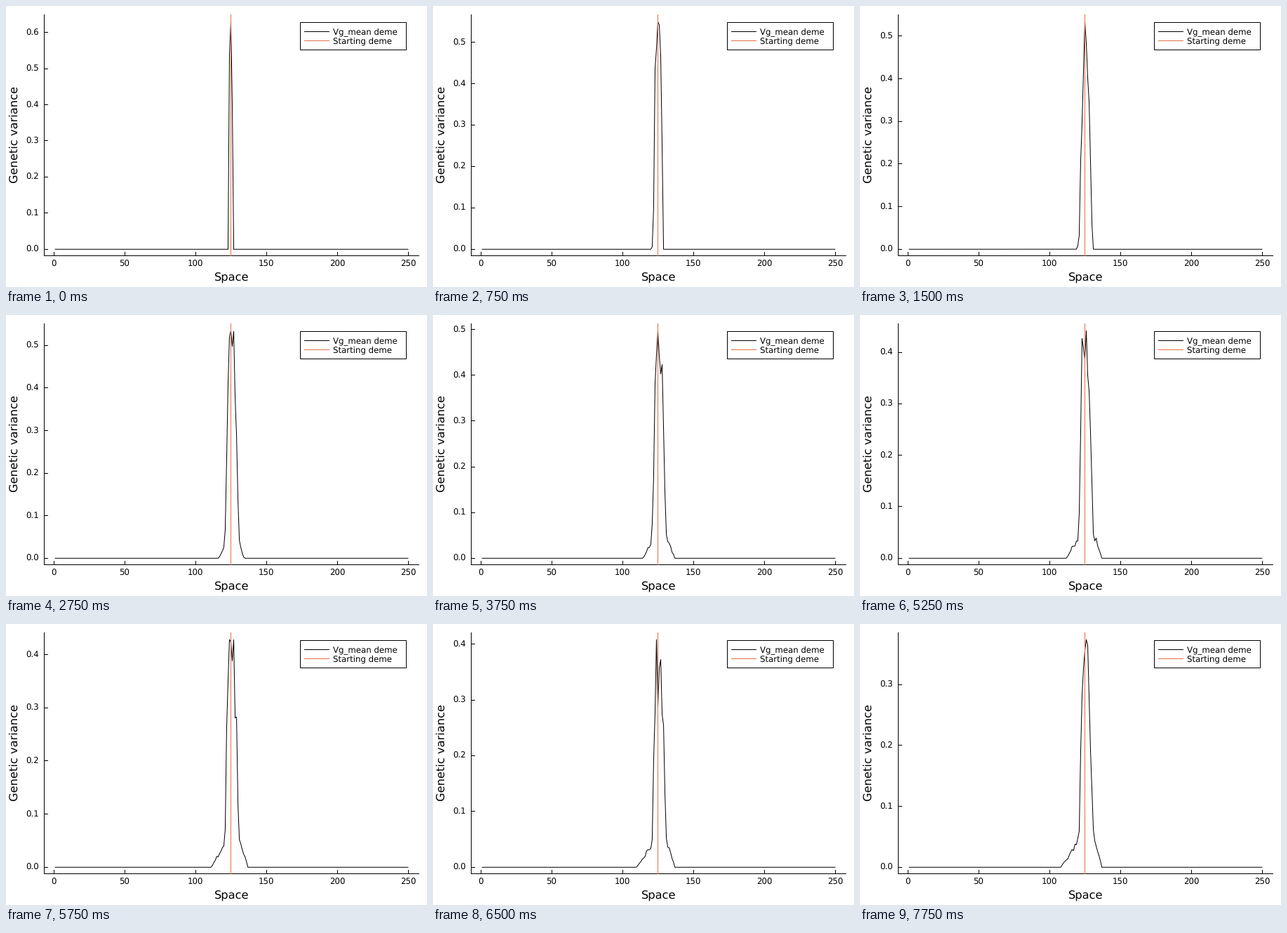
These frames come from a looping animation (600 by 400 pixels, 8000 ms). A matplotlib script:

```python
import numpy as np
import matplotlib.pyplot as plt
from matplotlib.animation import FuncAnimation
from matplotlib.patches import Rectangle

W, H, DPI = 600, 400, 100
PX = 72 / DPI                       # one pixel in points
FRAMES, INTERVAL = 32, 250
LEFT, RIGHT, TOP, BOTTOM = 55, 588, 12, 355.5     # plot area
AXIS_X, AXIS_Y = 54, 355            # pixels of the axis lines
ORANGE = "#E26F46"
START = 125

demes = np.arange(1, 251)
noise = np.random.default_rng(11).normal(0, .1, (FRAMES, demes.size))


def settle(step, pace):
    """Rise from 0 towards 1."""
    return 1 - np.exp(-step / pace)


def variance(step):
    """Mean genetic variance per deme: a steep core on a spreading foot."""
    low = START - 1.5 - 15.5 * (step / (FRAMES - 1)) ** .75
    high = START + 2 + 10 * min(step / 15, 1)
    left = demes < START
    off = np.abs(demes - START)

    grown = settle(step, 4)
    width = np.where(left, 1.7 + 1.7 * grown, 1.25 + 3.65 * grown)
    core = np.exp(-np.minimum(off / width, 5) ** 3.5)

    peak = np.interp(step, [0, 1, 6, 11, 21, 31],
                     [.63, .56, .534, .535, .442, .374])
    ramp = np.where(left, (demes - low) / max(START - 3 - low, 1),
                    (high - demes) / max(high - START - 4, 1))
    foot = np.where(left, .055, .08) * settle(step, 10) * ramp.clip(0, 1)

    v = np.maximum(core, foot / peak) * (1 + noise[step] * min(step / 3, 1))
    v[(demes <= low) | (demes >= high)] = 0
    return v * peak / v.max()


def to_x(deme):
    pad = .03 * 249
    return LEFT + (deme - 1 + pad) * (RIGHT - LEFT) / (249 + 2 * pad)


def to_y(value, peak):
    return BOTTOM - (value / peak + .03) * (BOTTOM - TOP) / 1.06


plt.rcParams.update({"font.family": "DejaVu Sans", "text.hinting": "none"})
fig = plt.figure(figsize=(W / DPI, H / DPI), dpi=DPI, facecolor="white")
ax = fig.add_axes([0, 0, 1, 1])
ax.set(xlim=(0, W), ylim=(H, 0))
ax.axis("off")


def line(xs, ys, color="black", z=2):
    return ax.plot(xs, ys, color=color, lw=PX, zorder=z)[0]


def label(x, y, text, size=11.8, **kw):
    return ax.text(x, y, text, fontsize=size * PX, va="baseline", **kw)


# axes
line([AXIS_X, AXIS_X], [TOP, AXIS_Y])
line([AXIS_X, RIGHT], [AXIS_Y, AXIS_Y])
for deme in range(0, 251, 50):
    x = to_x(deme)
    line([x, x], [AXIS_Y - 5, AXIS_Y])
    label(x, 371, str(deme), ha="center")
label(321.5, 392, "Space", 16.2, ha="center")
label(17, 183.3, "Genetic variance", 16.2, ha="center",
      rotation=90, rotation_mode="anchor")

y_ticks = []
for i in range(7):
    y_ticks.append((i / 10, line([AXIS_X, AXIS_X + 5], [0, 0]),
                    label(47, 0, f"{i / 10:.1f}", ha="right")))

# data
curve = line(to_x(demes), np.zeros(demes.size), z=3)
line([to_x(START)] * 2, [TOP, AXIS_Y], ORANGE, z=4)

# legend
ax.add_patch(Rectangle((419, 23), 151, 39, fc="white", ec="black",
                       lw=PX, zorder=5))
for y, color, text in ((36, "black", "Vg_mean deme"),
                       (49, ORANGE, "Starting deme")):
    line([425, 460], [y, y], color, z=6)
    label(466.3, y + 4, text, zorder=6)


def draw(step):
    v = variance(step)
    peak = v.max()
    curve.set_ydata(to_y(v, peak) + .5)      # centre of the pixel row
    for value, mark, text in y_ticks:
        y = to_y(value, peak)
        shown = y >= TOP
        mark.set_ydata([y, y])
        text.set_y(y + 4.4)
        mark.set_visible(shown)
        text.set_visible(shown)
    return [curve]


anim = FuncAnimation(fig, draw, frames=FRAMES, interval=INTERVAL,
                     init_func=lambda: draw(0), repeat=True, repeat_delay=0)
plt.show()
```
